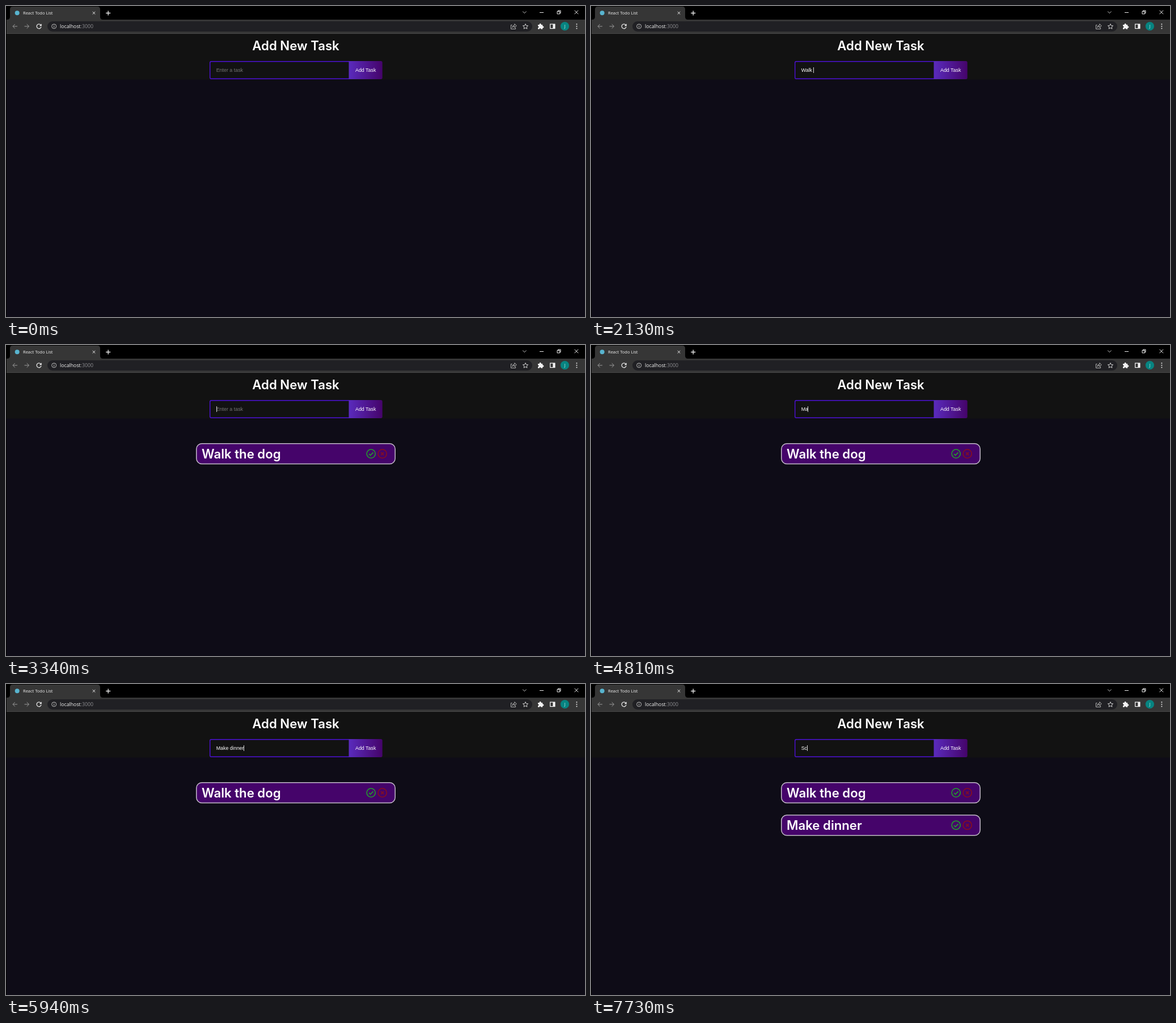
These frames come from a looping animation (1021 by 548 pixels, 8000 ms). An HTML page:

```html
<!DOCTYPE html>
<html lang="en">
<head>
<meta charset="utf-8">
<title>React Todo List</title>
<style>
  html, body { margin: 0; width: 100%; height: 100%; overflow: hidden; background: #0e0c17; }
  svg { display: block; width: 1021px; height: 548px; }
  .ui { font-family: "Open Sans", "Noto Sans", sans-serif; }
  .form { font: 8.89px "Liberation Sans", Arial, sans-serif; white-space: pre; }
  .title { font: 600 22.2px Inter, sans-serif; fill: #fff; }
  .line { fill: none; stroke: #e8e8e8; stroke-width: 1; }
</style>
</head>
<body>
<svg viewBox="0 0 1021 548">
  <defs>
    <linearGradient id="buttonFill">
      <stop offset="0" stop-color="#5a2bbd"/>
      <stop offset="1" stop-color="#45046a"/>
    </linearGradient>
    <g id="card">
      <rect x="335.8" y="173.8" width="350.4" height="35.7" rx="9.5" fill="#45046a" stroke="#c4bcc9" stroke-width="1.5"/>
      <g fill="none" stroke-width="1.6">
        <g stroke="#22a02c">
          <circle cx="643.7" cy="191.6" r="7.6"/>
          <path d="M640 191.8l2.6 2.6 4.9-5"/>
        </g>
        <g stroke="#8a0f1c">
          <circle cx="663.7" cy="191.6" r="7.6"/>
          <path d="M661.1 189l5.2 5.2m0-5.2l-5.2 5.2"/>
        </g>
      </g>
    </g>
  </defs>

  <rect width="1021" height="548" fill="#0e0c17"/>
  <rect y="48" width="1021" height="81.5" fill="#121212"/>

  <!-- Browser window -->
  <rect width="1021" height="24" fill="#000"/>
  <path d="M2 24q5 0 5-5V6q0-5 5-5h149q5 0 5 5v13q0 5 5 5z" fill="#363636"/>
  <rect y="24" width="1021" height="24" fill="#363636"/>
  <rect y="48" width="1021" height="1" fill="#4a4a4a"/>
  <rect y="24" width="1" height="524" fill="#000"/>
  <circle cx="19.7" cy="12.2" r="4" fill="#58b4cf"/>
  <text class="ui" x="30" y="15" font-size="7.5" fill="#f0f0f0">React Todo List</text>
  <path class="line" stroke-width="1.3" d="M152.7 10l4.6 4.6m0-4.6l-4.6 4.6"/>
  <path class="line" style="stroke-width:1.4" d="M176.2 12.5h8m-4-4v8"/>
  <path class="line" style="stroke:#bbb" d="M911 9.5l3.3 3.2 3.3-3.2"/>
  <path class="line" d="M941 11.5h7M972 9.5h4.5v4.5h-4.5zM973.5 9.5V8h4.5v4.5h-1.5M1002.5 7.7l6.6 6.6m0-6.6l-6.6 6.6"/>

  <!-- Toolbar -->
  <rect x="73" y="27" width="855" height="18" rx="9" fill="#202024"/>
  <path class="line" style="stroke:#999" d="M20 35.8h-8m3.8-3.8l-3.8 3.8 3.8 3.8M32.5 35.8h8m-3.8-3.8l3.8 3.8-3.8 3.8"/>
  <path class="line" style="stroke-width:1.3" d="M61.2 33.2a4 4 0 1 0 .9 3.5"/>
  <path d="M62.8 31.2v4h-4z" fill="#e8e8e8"/>
  <circle class="line" style="stroke:#bbb" cx="84.7" cy="35.8" r="4"/>
  <path class="line" style="stroke:#bbb" d="M84.7 35v3M84.7 33.2v1"/>
  <text class="ui" x="95" y="39" font-size="8.75" fill="#f0f0f0">localhost<tspan fill="#8d8d91">:3000</tspan></text>
  <path class="line" style="stroke:#c4c4c4;stroke-width:.9" d="M892.5 33.5h-2v7h8v-2.3M892.8 38q.5-4 4-4.2v-2.2l3.4 3.3-3.4 3.2v-2.2q-2.5 0-4 2.1z"/>
  <path class="line" style="stroke:#d0d0d0" d="M916 31.5l1.3 3 3.3.3-2.5 2.2.8 3.2-2.9-1.7-2.9 1.7.8-3.2-2.5-2.2 3.3-.3z"/>
  <path d="M938 33h2.6v-.8a1.5 1.5 0 0 1 3 0v.8h2.6v2.6h.7a1.5 1.5 0 0 1 0 3h-.7v2.2h-2.7a1.5 1.5 0 0 0-3 0H938v-2.6a1.5 1.5 0 0 0 0-3z" fill="#f4f4f4"/>
  <rect x="959.6" y="32" width="8.2" height="7.6" fill="none" stroke="#f4f4f4" stroke-width="1.2"/>
  <rect x="964.4" y="32" width="3.8" height="7.6" fill="#f4f4f4"/>
  <circle cx="985.4" cy="35.7" r="7.6" fill="#078481"/>
  <text class="ui" x="985.4" y="38.3" font-size="7" fill="#e6f2f2" text-anchor="middle">J</text>
  <g fill="#e8e8e8">
    <circle cx="1006.4" cy="32" r="1"/><circle cx="1006.4" cy="35.7" r="1"/><circle cx="1006.4" cy="39.4" r="1"/>
  </g>

  <!-- Task form -->
  <text class="title" x="511" y="78" text-anchor="middle">Add New Task</text>
  <path d="M605 97.7H362q-2.3 0-2.3 2.3v26q0 2.3 2.3 2.3h243" fill="none" stroke="#4d10d6" stroke-width="1.4"/>
  <path d="M604.5 97H661q2.7 0 2.7 2.7v26.6q0 2.7-2.7 2.7h-56.5z" fill="url(#buttonFill)"/>
  <text class="form" x="616" y="116" fill="#fff">Add Task</text>
  <text class="form" id="entry" x="370.67" y="116"></text>
  <rect id="caret" y="108" width="1" height="10" fill="#d8d8d8"/>

  <g id="walk"><use href="#card"/><text class="title" x="345" y="200">Walk the dog</text></g>
  <g id="dinner" transform="translate(0 57.2)"><use href="#card"/><text class="title" x="345" y="200">Make dinner</text></g>
</svg>

<script>
const LOOP = 8000, BLINK = 530, TEXT_X = 370.67;
const FOCUS = 460, WALK_ADDED = 3340, DINNER_ADDED = 6270;

// Each entry: when the text starts, the text, and the time of each keystroke
// paired with the number of letters then visible.
const entries = [
  { text: "Walk the dog", end: WALK_ADDED, keys: [
    [1520, 1], [1800, 2], [1930, 4], [2130, 5], [2260, 6], [2330, 7],
    [2400, 8], [2470, 9], [2670, 10], [2800, 11], [2940, 12]] },
  { text: "Make dinner", end: DINNER_ADDED, keys: [
    [4480, 1], [4810, 2], [4880, 3], [5010, 4], [5140, 5], [5340, 6],
    [5400, 7], [5540, 8], [5740, 9], [5800, 10], [5940, 11]] },
  { text: "Sc", end: LOOP, keys: [[7200, 1], [7730, 2]] }
];

const byId = id => document.getElementById(id);
const [entry, caret, walk, dinner] = ["entry", "caret", "walk", "dinner"].map(byId);
const ruler = document.createElement("canvas").getContext("2d");
ruler.font = '8.89px "Liberation Sans", Arial, sans-serif';

const show = (node, on) => node.setAttribute("visibility", on ? "visible" : "hidden");

function typingAt(time) {
  let typed = "", lastKey = FOCUS;
  for (const { text, end, keys } of entries) {
    for (const [at, count] of keys) {
      if (time < at) break;
      lastKey = at;
      typed = text.slice(0, count);
    }
    if (time < end) break;
    typed = "";
  }
  return { typed, lastKey };
}

function render(time) {
  const { typed, lastKey } = typingAt(time);
  entry.textContent = typed || "Enter a task";
  entry.setAttribute("fill", typed ? "#fff" : "#757575");
  caret.setAttribute("x", Math.max(371, Math.floor(TEXT_X + ruler.measureText(typed).width)));
  show(caret, time >= FOCUS && (time - lastKey) % (2 * BLINK) < BLINK);
  show(walk, time >= WALK_ADDED);
  show(dinner, time >= DINNER_ADDED);
}

const start = performance.now();
function tick() {
  render((performance.now() - start) % LOOP);
  requestAnimationFrame(tick);
}
tick();
</script>
</body>
</html>
```
